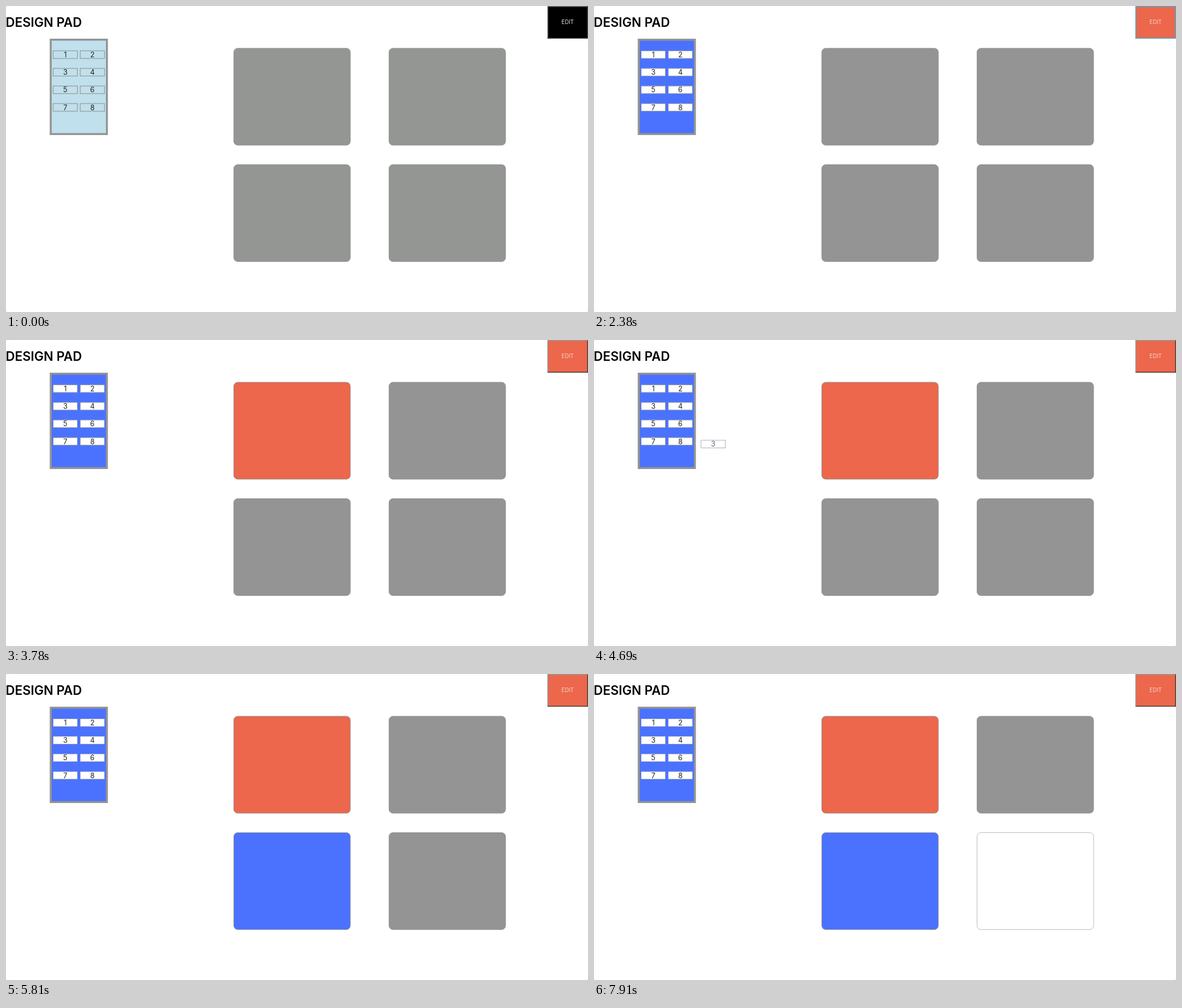
Animation, 1031 px wide and 543 px high, one loop 8000 ms. Source, as an HTML page:

```html
<!DOCTYPE html>
<html lang="en">
<head>
<meta charset="utf-8">
<title>Design pad</title>
<style>
html, body { margin: 0; width: 100%; height: 100%; overflow: hidden; background: #fff; }
svg { display: block; width: 1031px; height: 543px; }
text { font-family: Inter, "Liberation Sans", sans-serif; }
.num { font-size: 12.5px; text-anchor: middle; fill: #222; }
</style>
</head>
<body>
<svg id="stage" viewBox="0 0 1031 543"></svg>
<script>
const LOOP = 8000, STEP = 70;
const RED = '#ec674b', BLUE = '#4b72ff', GRAY = '#949494';
const EDIT_AT = 1330, BLUR_AT = 2590, SETTLE_AT = 5810;

const stage = document.getElementById('stage');

function add(tag, attrs, parent = stage, label = '') {
  const el = document.createElementNS('http://www.w3.org/2000/svg', tag);
  set(el, attrs);
  el.textContent = label;
  parent.appendChild(el);
  return el;
}

function set(el, attrs) {
  for (const key in attrs) el.setAttribute(key, attrs[key]);
}

function box(x, y, width, height, attrs, parent) {
  return add('rect', { x, y, width, height, ...attrs }, parent);
}

// Window corners
for (const [x, y] of [[0, 0], [0, 542], [1030, 542]]) box(x, y, 1, 1, { fill: '#c4c4c4' });

add('text', { x: -0.5, y: 37, 'font-size': 22.4, 'font-weight': 600, fill: '#000' }, stage, 'DESIGN PAD');

// Edit button
const face = box(959, 0, 72, 58, {});
const lit = add('path', { d: 'M959 58V0H1031L1029.5 1.5H960.5V56.5Z' });
const shade = add('path', { d: 'M959 58H1031V0L1029.5 1.5V56.5H960.5Z' });
const ring = box(960, 1, 70, 56, { rx: 1.5, fill: 'none', stroke: '#6f9bb0', 'stroke-width': 2 });
const editText = add('text', { x: 995, y: 32.3, 'font-size': 9.8, 'text-anchor': 'middle' }, stage, 'EDIT');

// Palette
box(77.5, 58, 103, 171, { fill: GRAY });
const panel = box(81, 61.5, 96, 164, {});
const cellAt = n => [105 + (n % 2 ? 0 : 48), 86.3 + 31.2 * Math.floor((n - 1) / 2)];
const cells = [];
for (let n = 1; n <= 8; n++) {
  const [x, y] = cellAt(n);
  cells.push(box(x - 21.5, y - 6.8, 43, 13.6, {}));
  add('text', { class: 'num', x, y: y + 4.7 }, stage, n);
}

// Pads, each with the time its colour drops in
const pads = [
  { x: 403, y: 74.5 },
  { x: 678, y: 74.5 },
  { x: 403, y: 281, at: 5180, color: BLUE },
  { x: 678, y: 281, at: 7140, color: '#fff' }
];
Object.assign(pads[0], { at: 3500, color: RED });
for (const p of pads) {
  p.el = box(p.x + 0.5, p.y + 0.5, 206.5, 172, { rx: 7, 'stroke-width': 1 });
}

// Drags from a cell to a resting point
const drags = [
  { n: 1, from: 2590, to: 3400, end: 3500, x: 507, y: 166 },
  { n: 3, from: 4480, to: 5110, end: 5180, x: 514.7, y: 376.8 },
  { n: 6, from: 6230, to: 7070, end: 7140, x: 774.8, y: 363.7 }
];
const ghost = add('g', {});
box(-21.5, -6.8, 43, 13.6, { fill: '#fff', stroke: '#8b8ba8', 'stroke-width': 0.7 }, ghost);
const ghostText = add('text', { class: 'num', x: 0, y: 4.7, style: 'fill:#666' }, ghost);

const ease = k => k * k * (3 - 2 * k);

function draw(t) {
  const on = t >= EDIT_AT;
  const focus = on && t < BLUR_AT;
  const show = yes => yes ? 'visible' : 'hidden';

  set(face, { fill: on ? RED : '#000' });
  set(lit, { fill: on ? '#8f9b97' : '#777', visibility: show(!focus) });
  set(shade, { fill: on ? '#4a403d' : '#444', visibility: show(!focus) });
  set(ring, { visibility: show(focus) });
  set(editText, { fill: on ? '#f6d5ce' : '#e2e2e2' });
  set(panel, { fill: on ? BLUE : '#bfe0ec' });

  const line = t < SETTLE_AT ? 1.2 : 0.7;
  for (const c of cells) {
    set(c, { fill: on ? '#fff' : '#bfe0ec', stroke: on ? '#8590b4' : '#969a9c', 'stroke-width': line });
  }

  for (const p of pads) {
    const filled = t >= p.at;
    const idle = on ? GRAY : '#949694';
    set(p.el, { fill: filled ? p.color : idle, stroke: filled && p.color === '#fff' ? '#bbb' : idle });
  }

  const d = drags.find(d => t >= d.from && t < d.end);
  set(ghost, { visibility: show(d) });
  if (d) {
    const k = ease(Math.min(1, (t - d.from) / (d.to - d.from)));
    const [x, y] = cellAt(d.n);
    set(ghost, { transform: `translate(${x + (d.x - x) * k} ${y + (d.y - y) * k})` });
    ghostText.textContent = d.n;
  }
}

const start = performance.now();
function tick() {
  const t = (performance.now() - start) % LOOP;
  draw(Math.floor(t / STEP) * STEP);
  requestAnimationFrame(tick);
}
tick();
</script>
</body>
</html>
```
